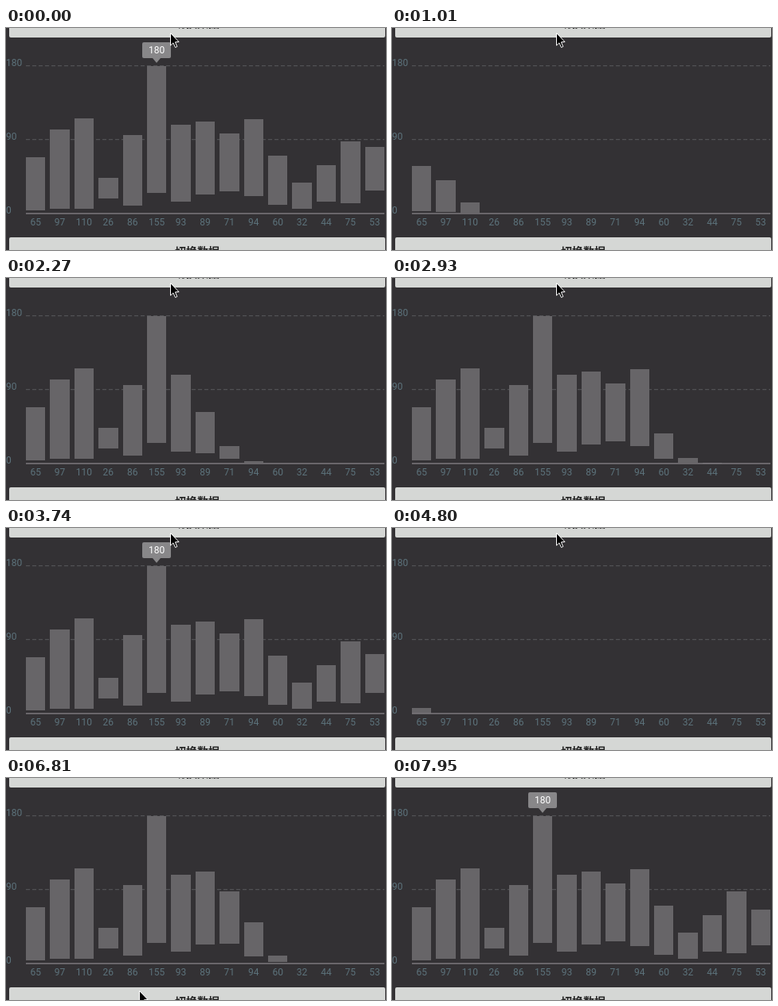
An HTML page with a canvas that plays this animation: 477x280 px, repeating every 8 s.

```html
<!DOCTYPE html>
<html lang="zh">
<head>
<meta charset="utf-8">
<style>
html, body { margin: 0; width: 100%; height: 100%; overflow: hidden; background: #333134; }
canvas { display: block; }
</style>
</head>
<body>
<canvas id="stage" width="477" height="280"></canvas>
<script>
const ctx = document.getElementById('stage').getContext('2d');
const LOOP = 8000;
const LEFT = 25, RIGHT = 475, BASE = 234, SCALE = 186 / 180;
const STAGGER = 0.29;
const BACK = '#333134', BAR = '#676568', LABEL = '#5c727b';

// Each bar floats: it spans from its low value to low + size
const sizes = [65, 97, 110, 26, 86, 155, 93, 89, 71, 94, 60, 32, 44, 75, 53];
const lows = [4, 6, 6, 18, 10, 25, 15, 23, 27, 21, 11, 6, 15, 13, 28];
const pitch = (RIGHT - LEFT + 6) / sizes.length;

// The picture refreshes eight times between neighbouring key times
const keys = [0, 500, 1550, 2690, 3740, 4680, 5760, 6810, 7950, 9000];

const ramp = (t, from, to) => Math.min(1, Math.max(0, (t - from) / (to - from)));

function snap(t) {
  const lead = t + 15;
  const i = keys.findIndex(k => k > lead);
  const start = keys[i - 1];
  const step = (keys[i] - start) / 8;
  return start + Math.floor((lead - start) / step) * step;
}

// Progress of the whole run, in units of one bar's growth time
function progress(t) {
  if (t < 500) return Infinity;
  return t < 4680 ? (t - 416) / 664 : (t - 4603) / 675;
}

function text(str, x, y, color, align = 'center', font = '12px Roboto, sans-serif') {
  ctx.font = font;
  ctx.textAlign = align;
  ctx.fillStyle = color;
  ctx.fillText(str, x, y);
}

function line(y, color, width, dash) {
  ctx.strokeStyle = color;
  ctx.lineWidth = width;
  ctx.setLineDash(dash);
  ctx.beginPath();
  ctx.moveTo(LEFT, y);
  ctx.lineTo(RIGHT, y);
  ctx.stroke();
}

function box(x, y, w, h, color) {
  ctx.fillStyle = color;
  ctx.beginPath();
  ctx.roundRect(x, y, w, h, 2);
  ctx.fill();
}

function polygon(...points) {
  ctx.beginPath();
  points.forEach(([x, y]) => ctx.lineTo(x, y));
  ctx.closePath();
  ctx.fill();
}

function button(y) {
  box(4, y, 472, 36, '#d5d7d5');
  text('切换数据', 240, y + 23.3, '#242424', 'center',
    '700 14px "Noto Sans CJK SC", "Noto Sans CJK", sans-serif');
}

function grid() {
  for (let i = 0; i < 3; i++) {
    const y = BASE - 93 * i;
    if (i) line(y - 0.3, '#515154', 1.2, [5, 3]);
    text(90 * i, 0, y, LABEL, 'left');
  }
}

function bar(i, run) {
  const x = LEFT + i * pitch;
  const grow = ramp(run, i * STAGGER, i * STAGGER + 1) ** 2;
  const yOf = value => Math.round(BASE - value * SCALE * grow);
  const left = Math.round(x), right = Math.round(x + pitch * 0.8);
  const top = yOf(lows[i] + sizes[i]);
  ctx.fillStyle = BAR;
  ctx.fillRect(left, top, right - left, yOf(lows[i]) - top);
  text(sizes[i], x + pitch * 0.4, 249, LABEL);
}

function tooltip() {
  box(171, 18, 36, 20, '#888789');
  polygon([184, 38], [194, 38], [189, 44]);
  text(180, 189.2, 32, '#fff');
}

function pointer(t) {
  const glide = ramp(t, 5000, 5760), settle = ramp(t, 5760, 6000), leave = ramp(t, 6810, 7000);
  ctx.save();
  ctx.translate(Math.round(206 - 32 * glide - 7 * settle - 2 * leave) + 0.5,
    Math.round(6 + 240 * glide + 22 * settle + 16 * leave) + 0.5);
  ctx.setLineDash([]);
  ctx.lineWidth = 1;
  ctx.fillStyle = '#000';
  ctx.strokeStyle = '#fff';
  polygon([0, 0], [0, 15.5], [3.5, 12.3], [6, 18], [8.3, 17], [5.9, 11.3], [10.5, 11]);
  ctx.stroke();
  ctx.restore();
}

function draw(t) {
  const run = progress(t);
  ctx.fillStyle = BACK;
  ctx.fillRect(0, 0, 477, 280);
  grid();
  sizes.forEach((_, i) => bar(i, run));
  line(BASE, '#7b797c', 1.5, []);
  if (run > (sizes.length - 1) * STAGGER) tooltip();
  button(-24);
  button(264);
  pointer(t);
}

function frame() {
  draw(snap(performance.now() % LOOP));
  requestAnimationFrame(frame);
}
frame();
</script>
</body>
</html>
```
